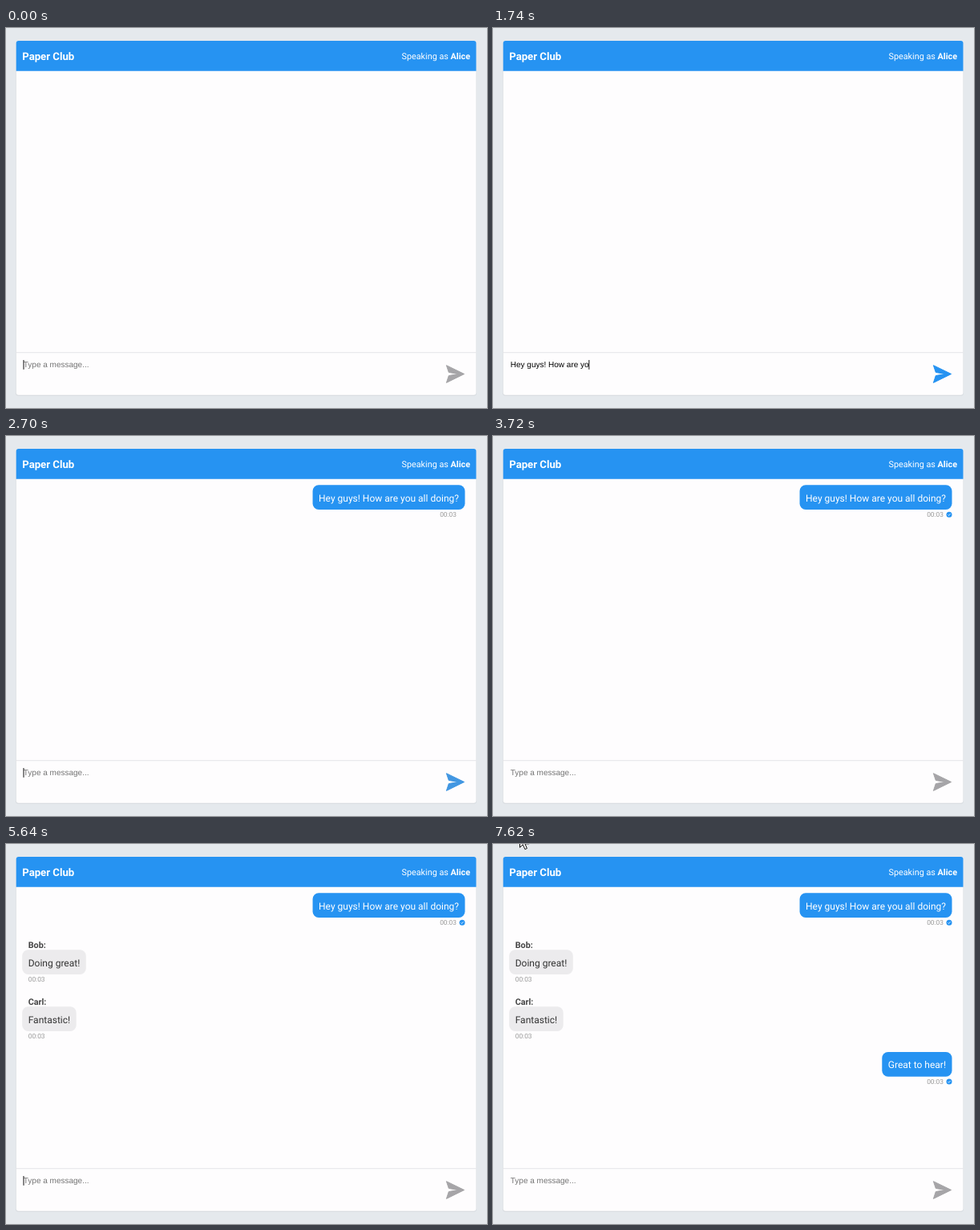
An HTML page that plays this animation: 600x475 px, repeating every 7.68 s.

```html
<!DOCTYPE html>
<html lang="en">
<head>
<meta charset="utf-8">
<title>Chat</title>
<style>
  html, body { margin: 0; width: 100%; height: 100%; overflow: hidden; background: #e5e9ed; }
  svg { display: block; width: 600px; height: 475px; }
  text { font-family: Roboto, sans-serif; text-rendering: geometricPrecision; white-space: pre; }
  .title { font-size: 13.2px; font-weight: 700; fill: #fff; }
  .who { font-size: 10.8px; fill: #fff; text-anchor: end; }
  .who tspan, .name { font-weight: 700; }
  .name { font-size: 10.8px; fill: #444; }
  .said { font-size: 12px; fill: #333; }
  .time { font-size: 8.4px; fill: #999; }
  .bubble { fill: #ecebed; }
  .mine .bubble { fill: #2693f2; }
  .mine .said { fill: #fff; }
  .mine text { text-anchor: end; }
  .field { font-family: "Liberation Sans", Arial, sans-serif; font-size: 10px; }
</style>
</head>
<body>
<svg viewBox="0 0 600 475">
  <rect width="600" height="475" fill="#e5e9ed"/>
  <rect x="12" y="16.2" width="575" height="443.6" rx="3.5" fill="#d6dade"/>
  <rect x="12.7" y="16" width="573.8" height="442.8" rx="3" fill="#fefdfe"/>
  <path d="M12.7 53.8V19a3 3 0 0 1 3-3H583.5a3 3 0 0 1 3 3V53.8Z" fill="#2693f2"/>
  <text class="title" x="20.2" y="39.6">Paper Club</text>
  <text class="who" x="579" y="38.9">Speaking as <tspan>Alice</tspan></text>
  <rect x="12.7" y="405.3" width="573.8" height="0.9" fill="#e2e2e5"/>
  <g id="log"></g>
  <text class="field" id="hint" x="21.8" y="424.4" fill="#757575">Type a message...</text>
  <text class="field" id="typed" x="21.8" y="424.4" fill="#000"></text>
  <rect id="caret" x="21.5" y="415" width="1" height="11.8" fill="#111"/>
  <path id="send" d="M549.4 421.7L571.6 432.5L549.4 443.4L552.3 434.6L564 432.5L552.3 430.4Z"
        stroke-width="1" stroke-linejoin="round"/>
  <path id="pointer" d="M0 0V16L3.8 12.4L6.4 18.3L8.9 17.2L6.4 11.5H11.6Z" fill="#fff" stroke="#111" stroke-width="1"/>
</svg>
<script>
const LOOP = 7680, STEP = 60, BLINK = 360;
const $ = id => document.getElementById(id);

function add(parent, tag, attrs, text) {
  const el = document.createElementNS('http://www.w3.org/2000/svg', tag);
  for (const k in attrs) el.setAttribute(k, attrs[k]);
  if (text) el.textContent = text;
  return parent.appendChild(el);
}

function message(at, y, said, name) {
  const mine = !name;
  const g = add($('log'), 'g', { class: mine ? 'mine' : '' });
  if (name) add(g, 'text', { class: 'name', x: 27.7, y: y - 2.4 }, name + ':');
  const box = add(g, 'rect', { class: 'bubble', y, height: 30.6, rx: 7.5 });
  const words = add(g, 'text', { class: 'said', x: mine ? 565 : 27.7, y: y + 20.2 }, said);
  add(g, 'text', { class: 'time', x: mine ? 562 : 27.7, y: y + 39.9 }, '00:03');
  let seen = null;
  if (mine) {
    seen = add(g, 'g', {});
    add(seen, 'circle', { cx: 569, cy: y + 37, r: 3.5, fill: '#2693f2' });
    add(seen, 'path', { d: `M567.4 ${y + 37.1}l1.1 1.1 2.1-2.3`, fill: 'none', stroke: '#fff', 'stroke-width': 0.8 });
  }
  return { at, g, box, words, seen, mine };
}

const messages = [
  message(2640, 61.3, 'Hey guys! How are you all doing?'),
  message(3900, 132.3, 'Doing great!', 'Bob'),
  message(4500, 203.3, 'Fantastic!', 'Carl'),
  message(6780, 260.1, 'Great to hear!')
];

function fitBubbles() {
  for (const m of messages) {
    const w = m.words.getComputedTextLength() + 15;
    m.box.setAttribute('width', w);
    m.box.setAttribute('x', m.mine ? 572.5 - w : 20.2);
  }
}

// Bursts of typing: first key, last key, characters
const bursts = [
  [120, 780, 'Hey guys'],
  [900, 900, '! '],
  [1020, 1380, 'How are'],
  [1620, 2280, ' you all doing'],
  [2460, 2460, '?'],
  [5760, 6420, 'Great to hear'],
  [6600, 6600, '!']
];
const sends = [2640, 6780];

function typedAt(t) {
  const since = Math.max(0, ...sends.filter(s => s <= t));
  let out = '';
  for (const [from, to, chars] of bursts) {
    if (from < since || t < from) continue;
    const part = to > from ? Math.min(1, (t - from) / (to - from)) : 1;
    out += chars.slice(0, 1 + Math.floor(part * (chars.length - 1) + 1e-6));
  }
  return out;
}

function caretOn(t) {
  if (t >= 7140) return false;
  if (t < 2640 || t >= 5760 && t < 6780) return true;
  const start = t < 6780 ? 2640 : 6780;
  return Math.floor((t - start) / BLINK) % 2 === 0;
}

// Send button colour: 0 grey, 1 blue
function readiness(t) {
  const ramp = at => {
    const p = Math.min(1, Math.max(0, (t - at) / 200));
    return p * p * (3 - 2 * p);
  };
  return ramp(120) - ramp(2640) + ramp(5760) - ramp(6780);
}

function draw(t) {
  const words = typedAt(t);
  $('typed').textContent = words;
  $('hint').style.display = words ? 'none' : '';
  $('caret').style.display = caretOn(t) ? '' : 'none';
  $('caret').setAttribute('x', 21.5 + (words ? $('typed').getComputedTextLength() : 0));

  const k = readiness(t), mix = (a, b) => Math.round(a + (b - a) * k);
  const ink = `rgb(${mix(166, 38)},${mix(165, 147)},${mix(168, 242)})`;
  $('send').setAttribute('fill', ink);
  $('send').setAttribute('stroke', ink);

  for (const m of messages) {
    m.g.style.visibility = t >= m.at ? 'visible' : 'hidden';
    if (m.seen) m.seen.style.visibility = t >= m.at + 180 ? 'visible' : 'hidden';
  }

  const slide = Math.min(1, (t - 7440) / 180);
  $('pointer').style.display = t >= 7440 ? '' : 'none';
  $('pointer').setAttribute('transform', `translate(33.5 ${-17 + 5.3 * slide})`);
}

const begin = performance.now();
function frame() {
  const t = Math.max(0, performance.now() - begin) % LOOP;
  draw(Math.floor(t / STEP) * STEP);
  requestAnimationFrame(frame);
}
fitBubbles();
frame();
</script>
</body>
</html>
```
